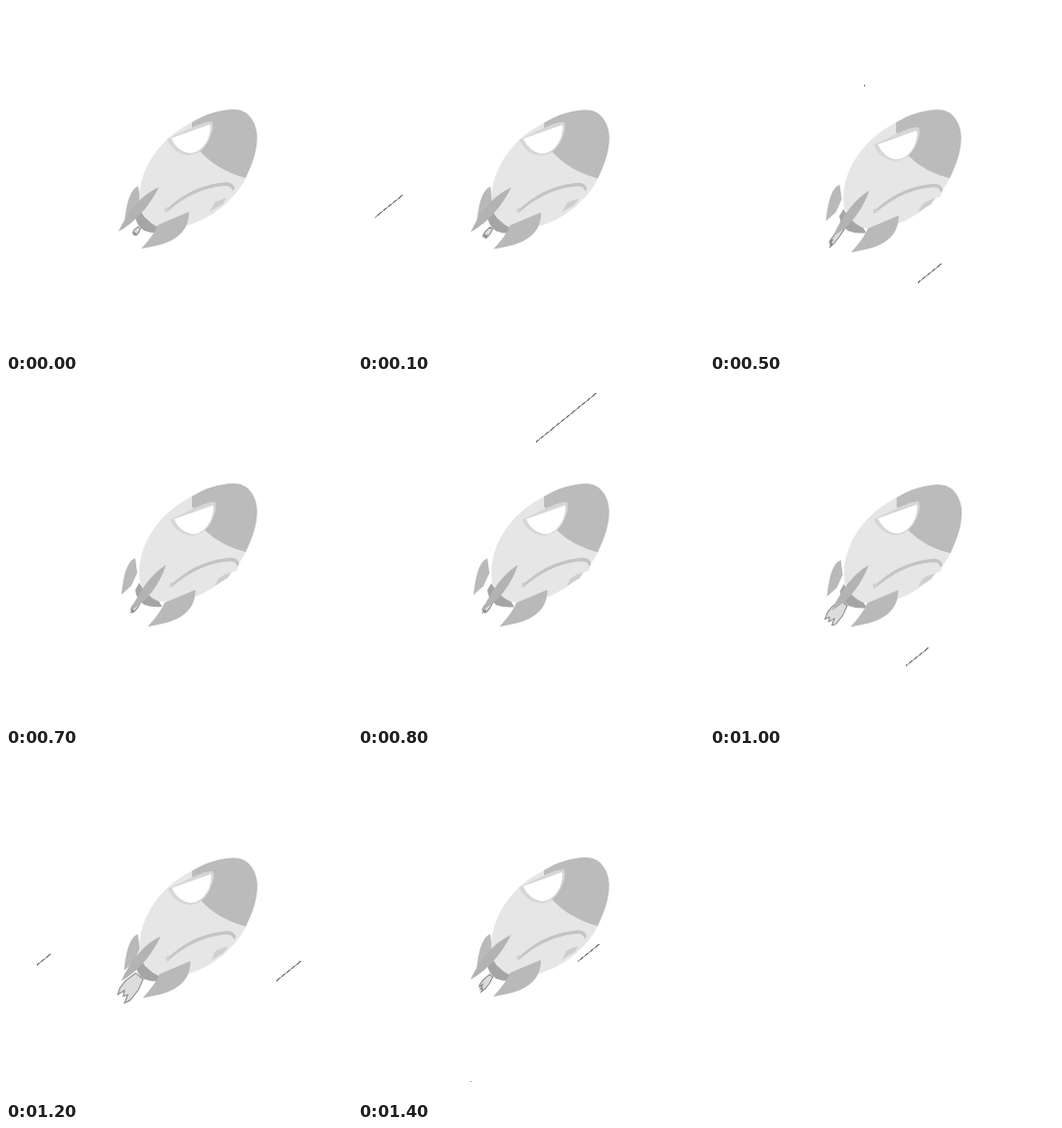
Write an HTML page that moves like this. It is 348 by 348 pixels and loops after 1.5 s.

```html
<!DOCTYPE html>
<html lang="en">
<head>
<meta charset="utf-8">
<title>Rocket</title>
<style>
html, body { margin: 0; width: 100%; height: 100%; overflow: hidden; background: #fff; }
svg { display: block; width: 100vw; height: 100vh; }
</style>
</head>
<body>
<svg viewBox="0 0 348 348">
  <g id="streaks" stroke="#858585" stroke-width="1.1" shape-rendering="crispEdges"></g>
  <g id="rocket"></g>
</svg>
<script>
const NS = 'http://www.w3.org/2000/svg';
const LOOP = 1500, STEP = 100, SLOPE = .81;
const { PI, sin, cos, max, floor } = Math;
const rocket = document.getElementById('rocket');
const sky = document.getElementById('streaks');

function add(parent, tag, attrs = {}) {
  const el = document.createElementNS(NS, tag);
  set(el, attrs);
  return parent.appendChild(el);
}

function set(el, attrs) {
  for (const k in attrs) el.setAttribute(k, attrs[k]);
}

function part(fill, path, dx = 0, dy = 0) {
  return { el: add(rocket, 'path', { fill, d: path }), dx, dy };
}

// Each part slides by (dx, dy) as the hull rolls.
const HULL = 'M187 117C200 109 216 104 229 104C243 104 251 115 252.5 130C253 146 247 160 241 173';
const flame = add(rocket, 'path', { fill: '#dcdcdc', stroke: '#858585', 'stroke-width': 1 });
const parts = [
  part('#b9b9b9', 'M133 181C124 185 121 200 119 218L129 209L135 196Z', -3, -2),
  part('#a5a5a5', 'M134 204L130 211Q131 221 139 226Q147 229 157 228L153 221L140 213Z'),
  part('#e6e6e6', HULL + 'Q237 182 228 192Q210 212 185 220Q166 226 152 222Q141 217 135 204Q131 181 144 157Q159 131 187 117Z')
];
const nose = add(rocket, 'path', { fill: '#bbb' });
parts.push(
  part('#d6d6d6', 'M162 134L187 122Q200 116 207 116Q210 121 205 133Q198 149 184 150Q169 149 162 134Z', 3, 6.5),
  part('#fff', 'M166 133Q186 126 205 119Q207 123 203 134Q196 148 184 148Q172 146 166 133Z', 3, 7),
  part('#cecece', 'M205 207L210 197L222 193L218 199Z', 5, 0),
  part('#e6e6e6', 'M161 206Q184 181 229 178L230 184L228 190L217 193L209 198L196 207Z', 4, 2),
  part('#c4c4c4', 'M160 206Q184 182 215 178Q229 175 230 184L228 186Q227 180 218 181Q188 184 162 207Z', 4.5, 1.5),
  part('#d0d0d0', 'M159 204L163 202L164 206L161 208Z', 5, 1)
);
const midFin = add(rocket, 'path', { fill: '#b3b3b3' });
parts.push(
  part('#b9b9b9', 'M184 207L153 220Q149 230 136 244C162 240 184 233 184 207Z', 6.5, 4)
);

// upper right end, length across, step
const streaks = [
  [45, 190, 28, 1], [348, 136, 43, 2], [232, 49, 13, 3], [190, 52, 35, 4],
  [233, 259, 24, 5], [240, 13, 61, 8], [220, 269, 23, 10],
  [45, 201, 14, 12], [297, 208, 25, 12], [150, 300, 37, 13], [243, 191, 22, 14]
].map(([x, y, span, start]) => ({ el: add(sky, 'line'), x, y, span, start }));

const nosePath = r => `${HULL}Q${212 + 5 * r} ${165 + 2 * r} ${195 + 6 * r} ${146 + 6 * r}L187 ${122 + 5 * r}Z`;

const midFinPath = r => {
  const x = 113 + 12 * r, y = 227 + 5 * r;
  return `M${154 + 7 * r} ${182 + 4 * r}Q${x + 16} ${y - 34} ${x} ${y}Q${x + 25} ${y - 14} ${154 + 7 * r} ${182 + 4 * r}Z`;
};

function flamePath(len, width, seed) {
  const pts = [[0, -.3], [.4, -.5]];
  for (let i = 0; i <= 6; i++) {
    const jitter = .06 * sin(seed * 7 + i * 5);
    const u = (i % 2 ? 1 : .8) - .12 * (i / 6) + jitter;
    pts.push([u, i / 6 - .5]);
  }
  pts.push([.4, .5], [0, .3]);
  return 'M' + pts.map(([u, v]) => `${u * len} ${v * width}`).join('L') + 'Z';
}

function draw(time) {
  const step = floor((time % LOOP) / STEP);
  const turn = 2 * PI * step / 15;
  const roll = max(0, 1 - ((step - 7) / 5.6) ** 2);
  const bump = cos(turn - 1.17) ** 4;
  set(rocket, { transform: `translate(${.7 * bump} ${1.4 * bump})` });

  for (const p of parts) set(p.el, { transform: `translate(${p.dx * roll} ${p.dy * roll})` });
  set(nose, { d: nosePath(roll) });
  set(midFin, { d: midFinPath(roll) });

  // Two bursts per loop, the second one wider.
  const len = 17 - 8 * cos(2 * turn) + step / 2;
  const width = 5 + 12 * max(0, -sin(turn)) ** 2;
  set(flame, {
    d: flamePath(len, width, step),
    transform: 'translate(134 223) rotate(129)'
  });

  // A streak shows for one step and leaves a speck at its lower end.
  for (const { el, x, y, span, start } of streaks) {
    const age = step - start;
    const from = age === 1 ? span - 1 : 0;
    set(el, {
      x1: x - from, y1: y + from * SLOPE,
      x2: x - span, y2: y + span * SLOPE,
      visibility: age === 0 || age === 1 ? 'visible' : 'hidden'
    });
  }
}

const begin = performance.now();
function tick() {
  draw(performance.now() - begin);
  requestAnimationFrame(tick);
}
tick();
</script>
</body>
</html>
```
